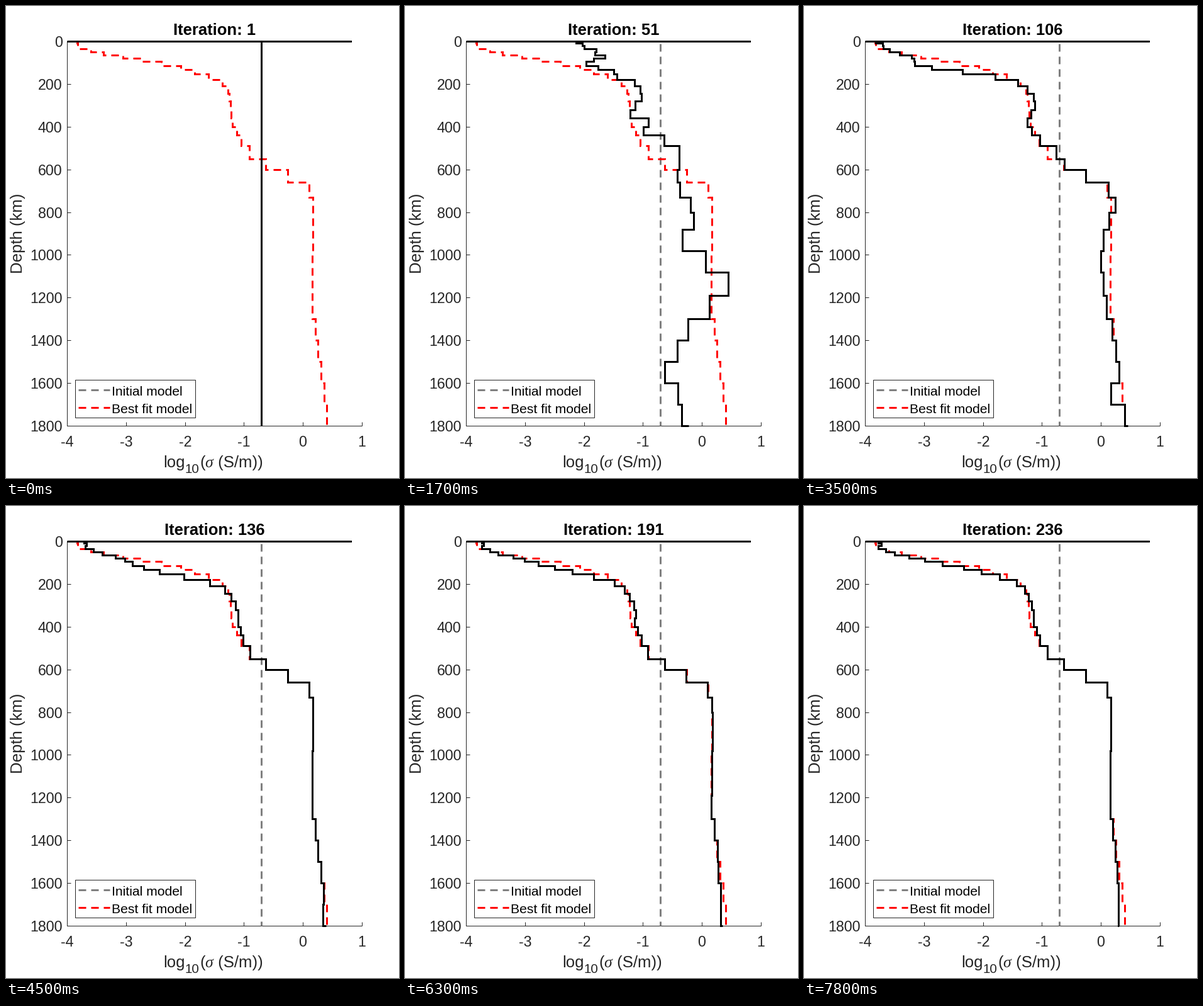
Animation, 625 px wide and 750 px high, one loop 8 s. Source, as a matplotlib script:

```python
import numpy as np
import matplotlib.pyplot as plt
from matplotlib.animation import FuncAnimation
from matplotlib.patches import Rectangle

W, H, DPI = 625, 750, 100
PX = 72 / DPI
LEFT, RIGHT, TOP, BOTTOM = 97, 566, 56, 667
START = 406              # uniform initial model
SEA = 549                # thin conductive layer on top
INK, GRAY = "#262626", "#808080"

# Layers as runs of (count, thickness in km)
runs = [(2, 10), (5, 15), (3, 19), (2, 29), (2, 35), (4, 40), (1, 50), (1, 60),
        (1, 50), (1, 60), (2, 70), (1, 80), (2, 100), (2, 110), (5, 100)]
counts, thickness = zip(*runs)
depth = np.r_[0, np.cumsum(np.repeat(thickness, counts))]
layer_y = TOP + depth * (BOTTOM - TOP) / depth[-1]
layer = np.arange(len(depth))

# Best fit: horizontal position at a few layers, straight between them
knots = [(0, 113), (2, 115), (4, 155), (8, 278), (11, 344), (12, 353),
         (16, 360), (18, 374), (19, 387), (20, 413), (22, 482), (23, 488),
         (28, 487), (34, 515)]
best = np.interp(layer, *zip(*knots))


def bumps(*parts):
    """Sum of bell curves given as (layer, width, size)."""
    return sum(size * np.exp(-((layer - mid) / width) ** 2)
               for mid, width, size in parts)


# (update, model, jitter until the next one, overshoot on the way)
stages = [
    (0, np.full(len(layer), float(START)), 8, bumps((19, 1.2, 22))),
    (6, START + bumps((3, 6.5, -35), (5, 0.4, 20), (10, 0.6, -30),
                      (15, 0.8, -24), (19.3, 2, 60), (25, 2.5, 40),
                      (33.5, 1.2, 15)), 10, bumps((27, 1.2, 45))),
    (15, best + bumps((2.5, 3.8, 80), (7.2, 1.6, -118), (13.5, 1.5, -12),
                      (20, 0.8, 14), (22.6, 0.8, -22), (25, 0.7, -18),
                      (27.5, 0.8, 22), (32, 2.6, -45)), 5,
     bumps((1, 1.2, -40), (32, 1.2, 28))),
    (21, best + bumps((1.5, 1, 14), (7.6, 2, -78), (13.5, 1.2, 12),
                      (16.5, 0.7, -9), (19, 0.6, 14), (23, 0.9, 9),
                      (26, 2, -15), (32, 0.5, -18)), 3,
     bumps((33, 1.2, 14))),
    (27, best + bumps((1, 2, 14), (8.3, 2.6, -60), (15, 2.5, 11),
                      (33.5, 1, -8)), 1, 0),
    (47, best + bumps((1, 1.3, 10), (7, 3.2, -27), (15, 2, 7),
                      (35, 3, -16)), 0, 0),
]
starts = [s[0] for s in stages]


def model_at(step):
    i = min(np.searchsorted(starts, step, side="right") - 1, len(stages) - 2)
    begin, here, jitter, overshoot = stages[i]
    end, there = stages[i + 1][:2]
    u = (step - begin) / (end - begin)
    noise = np.random.default_rng(step).normal(0, jitter, len(layer))
    x = here + (there - here) * u + np.sin(np.pi * u) * (noise + overshoot)
    return np.clip(x, LEFT, 543)


def stairs(x):
    xs = np.append(np.repeat(x[:-1], 2), x[-1])
    ys = np.append(np.repeat(layer_y, 2)[1:-1], BOTTOM)
    return xs, ys


def text(x, y, s, size, color=INK, family="Liberation Sans", **kw):
    return ax.text(x, y, s, fontsize=size * PX, color=color, family=family,
                   va="baseline", **kw)


def line(xs, ys, color, width=3, dash=None, **kw):
    ln, = ax.plot(xs, ys, color=color, lw=width * PX, solid_capstyle="butt",
                  solid_joinstyle="miter", dash_capstyle="butt",
                  dash_joinstyle="miter", **kw)
    if dash is not None:
        ln.set_linestyle((dash / width, (12 / width, 8 / width)))
    return ln


fig = plt.figure(figsize=(W / DPI, H / DPI), dpi=DPI, facecolor="white")
ax = fig.add_axes([0, 0, 1, 1])
ax.set_xlim(0, W)
ax.set_ylim(H, 0)
ax.axis("off")

# Axes, ticks and labels
line([LEFT, LEFT], [TOP, BOTTOM], INK, 1)
line([LEFT, RIGHT], [BOTTOM, BOTTOM], INK, 1)
for i, y in enumerate(np.linspace(TOP, BOTTOM, 10).round()):
    line([LEFT, LEFT + 6], [y, y], INK, 1)
    text(89.5, y + 9, str(200 * i), 23.3, ha="right")
for i, x in enumerate(np.linspace(LEFT, RIGHT, 6).round()):
    line([x, x], [BOTTOM, BOTTOM - 6], INK, 1)
    text(x, 699.5, str(i - 4), 23.3, ha="center")

text(26, 361.5, "Depth (km)", 25.7, rotation=90, rotation_mode="anchor",
     ha="center")
text(250.5, 733, "log", 25.7)
text(285, 742, "10", 20.5)
text(308, 733, "(", 25.7)
text(316.5, 733, "σ", 25.7, family="Liberation Serif", style="italic")
text(330.5, 733, " (S/m))", 25.7)
title = text(331.5, 46, "", 25.6, "black", weight="bold", ha="center")

# Models
line([START, START], [TOP + 4, BOTTOM], GRAY, dash=0, zorder=3)
line(*stairs(best), "red", dash=4, zorder=4)
current = line([], [], "black", zorder=5)

# Legend
ax.add_patch(Rectangle((110, 594), 191, 60, fc="white", ec=INK, lw=PX,
                       zorder=6))
for y, color, label in ((610, GRAY, "Initial model"),
                        (638, "red", "Best fit model")):
    line([115, 165], [y, y], color, dash=0, zorder=7)
    text(168.5, y + 9, label, 21.1, "black", zorder=7)


def draw(tick):
    step = int((tick + 0.5) * 0.6)     # six updates a second
    xs, ys = stairs(model_at(step))
    current.set_data(np.r_[LEFT, SEA, xs], np.r_[TOP, TOP, ys])
    title.set_text(f"Iteration: {1 + 5 * step}")
    return current, title


anim = FuncAnimation(fig, draw, frames=80, interval=100, repeat=True,
                     repeat_delay=0, blit=False)
plt.show()
```
